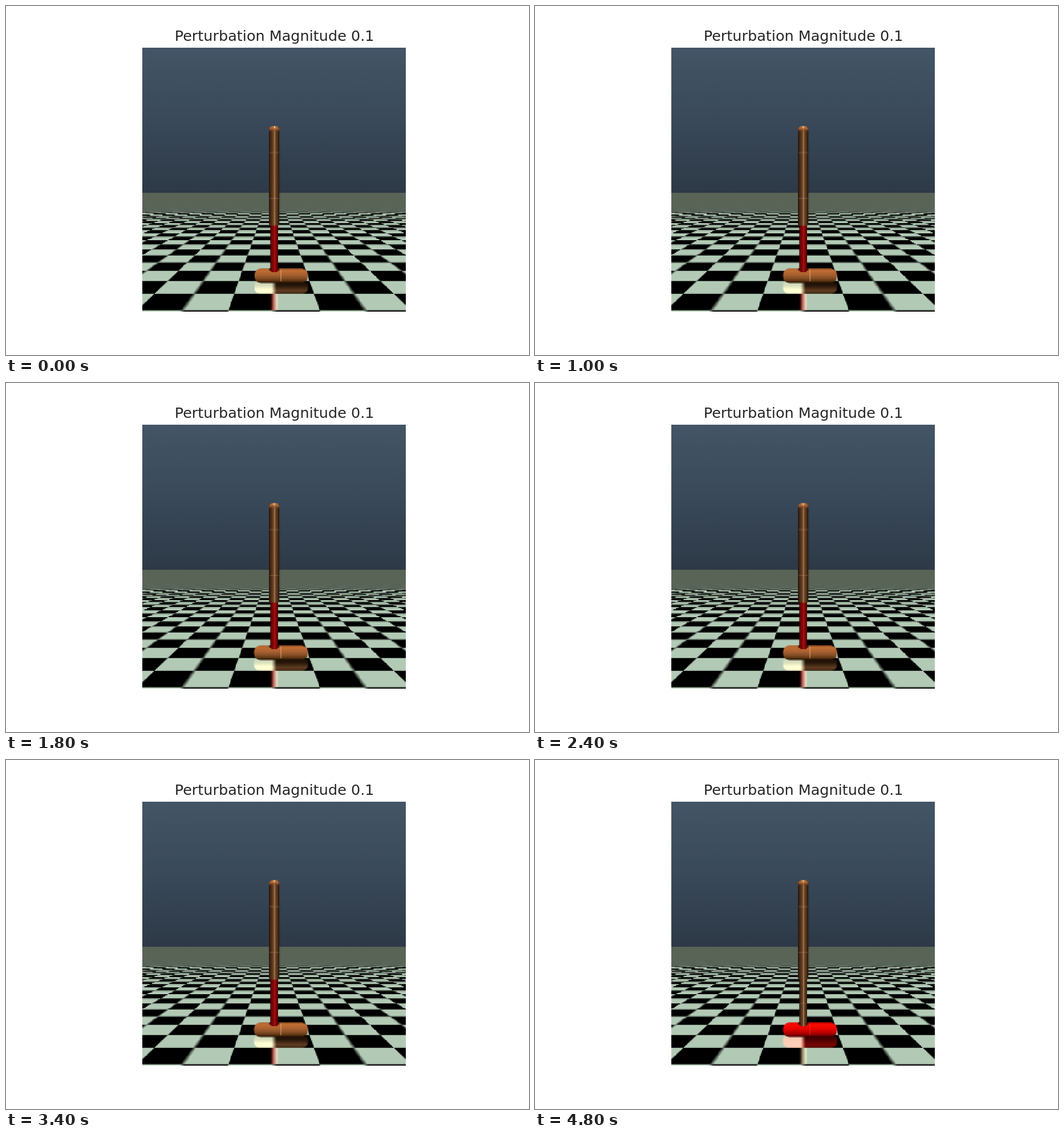
Animation, 917 px wide and 611 px high, one loop 5 s. Source, as an HTML page with a canvas:

```html
<!DOCTYPE html>
<html lang="en">
<head>
<meta charset="utf-8">
<title>Perturbation Magnitude</title>
<style>
  html, body { margin: 0; width: 100%; height: 100%; overflow: hidden; background: #fff; }
  canvas { display: block; }
</style>
</head>
<body>
<canvas id="stage" width="917" height="611"></canvas>
<script>
const LOOP = 5000, STEP = 200;
const RES = 256;
const VIEW = { x: 239.4, y: 73.2, size: 461.4 };
const PX = VIEW.size / RES;
const CX = 470.3;
const EYE_X = VIEW.x + VIEW.size / 2, EYE_Y = VIEW.y + VIEW.size / 2;
const EDGE_ROW = 141, EDGE_Y = VIEW.y + EDGE_ROW * PX;
const NEAR = 228.6, TILE = 0.35, FOCAL = 557;

const out = document.getElementById('stage').getContext('2d');

// The scene is drawn coarsely in stage coordinates, then enlarged without smoothing
const scene = document.createElement('canvas');
scene.width = scene.height = RES;
const ctx = scene.getContext('2d');
ctx.setTransform(1 / PX, 0, 0, 1 / PX, -VIEW.x / PX, -VIEW.y / PX);

const clamp = (v, a, b) => Math.min(b, Math.max(a, v));

// Square wave of period 2 averaged over a window of width w
const ramp = u => {
  const m = ((u % 2) + 2) % 2;
  return m < 1 ? m : 2 - m;
};
const wave = (u, w) => (ramp(u + w / 2) - ramp(u - w / 2)) / w;

function gradient(x0, y0, x1, y1, stops) {
  const g = ctx.createLinearGradient(x0, y0, x1, y1);
  stops.forEach(([at, color]) => g.addColorStop(at, color));
  return g;
}

function makeFloor() {
  const h = RES - EDGE_ROW;
  const layer = document.createElement('canvas');
  layer.width = RES;
  layer.height = h;
  const c = layer.getContext('2d');
  const img = c.createImageData(RES, h);
  const tile = [178, 202, 181], haze = [89, 100, 87];
  const rowStep = TILE / FOCAL;
  for (let j = 0; j < h; j++) {
    const d = EDGE_Y + (j + 0.5) * PX - EYE_Y;
    const row = (1 / d - 1 / NEAR) / rowStep;
    const sy = wave(row, PX / (d * d * rowStep));
    const scale = 1 / (TILE * d);
    const fade = clamp((d - 48) / 11, 0, 1);
    for (let i = 0; i < RES; i++) {
      const col = (VIEW.x + (i + 0.5) * PX - EYE_X) * scale;
      const soft = Math.round(col) % 2 === 0 ? 0.11 : 0;
      const sx = wave(col, Math.max(PX * scale, soft));
      const lit = 0.5 + 0.5 * sx * sy;
      const at = (j * RES + i) * 4;
      for (let k = 0; k < 3; k++) {
        img.data[at + k] = haze[k] + (tile[k] * lit - haze[k]) * fade;
      }
      img.data[at + 3] = 255;
    }
  }
  c.putImageData(img, 0, 0);
  return layer;
}

const floor = makeFloor();

const ROD = {
  wood: [[0, '#22130a'], [0.15, '#442714'], [0.4, '#623c20'], [0.5, '#875f40'], [0.55, '#9c7555'], [0.64, '#65401f'], [0.87, '#432713'], [1, '#20110a']],
  red: [[0, '#3c0000'], [0.18, '#6c0203'], [0.43, '#8a0608'], [0.54, '#a01216'], [0.68, '#880506'], [0.87, '#600102'], [1, '#350000']]
};
const FOOT = {
  wood: [[0, '#a85a26'], [0.15, '#c26e35'], [0.4, '#ab6230'], [0.65, '#895027'], [0.87, '#55300f'], [1, '#241307']],
  red: [[0, '#e40500'], [0.18, '#fb0b04'], [0.45, '#e50300'], [0.68, '#bd0100'], [0.87, '#800000'], [1, '#3c0000']]
};
const FOOT_GLOW = {
  wood: [[0, '#1c0f05'], [0.35, '#2c190b'], [0.7, '#5c3b20'], [1, '#4a2d16']],
  red: [[0, '#3a0200'], [0.4, '#560300'], [0.75, '#760602'], [1, '#640300']]
};
const SHIN_GLOW = {
  wood: [[0, '#140b05'], [0.45, '#523824'], [1, '#140b05']],
  red: [[0, '#240000'], [0.45, '#6c1512'], [1, '#180400']]
};

function pill(x, y, w, h, r, fill) {
  ctx.fillStyle = fill;
  ctx.beginPath();
  ctx.roundRect(x, y, w, h, r);
  ctx.fill();
}

function rod(top, bottom, half, tone, r) {
  const fill = gradient(CX - half, 0, CX + half, 0, ROD[tone]);
  pill(CX - half, top, half * 2, bottom - top, r, fill);
}

function seam(y, half) {
  ctx.fillStyle = 'rgba(205,165,125,0.25)';
  ctx.fillRect(CX - half + 1, y, half * 2 - 2, PX);
}

function drawBackdrop() {
  ctx.fillStyle = gradient(0, VIEW.y, 0, EDGE_Y, [[0, '#435566'], [0.5, '#394959'], [1, '#2d3947']]);
  ctx.fillRect(VIEW.x, VIEW.y, VIEW.size, EDGE_Y - VIEW.y);
  ctx.drawImage(floor, VIEW.x, EDGE_Y, VIEW.size, floor.height * PX);
}

function drawGlow(tone, left) {
  ctx.save();
  ctx.globalCompositeOperation = 'lighter';
  pill(left, 484, 529 - left, 19.5, [3, 3, 9, 9], gradient(0, 484, 0, 503.5, FOOT_GLOW[tone('foot')]));
  ctx.fillStyle = gradient(CX - 7, 0, CX + 7, 0, SHIN_GLOW[tone('shin')]);
  ctx.fillRect(CX - 7, 503.5, 14, 29);
  ctx.restore();
}

function drawFoot(tone, left) {
  pill(left, 459.2, 529 - left, 25.8, 11, gradient(0, 459.2, 0, 485, FOOT[tone]));
  ctx.fillStyle = tone === 'red' ? 'rgba(255,70,50,0.35)' : 'rgba(240,180,125,0.5)';
  ctx.fillRect(481, 461, PX, 21);
  ctx.fillStyle = 'rgba(30,10,4,0.75)';
  ctx.fillRect(461.5, 459.2, 18, 4);
}

function drawCap(shift) {
  const shape = [7, 7, 0, 0];
  pill(CX - 9.2, 210.8, 18.4, 10, shape, gradient(0, 210.8, 0, 220.8,
    [[0, '#c47a40'], [0.5, 'rgba(168,94,46,0.8)'], [1, 'rgba(110,64,36,0)']]));
  ctx.fillStyle = '#f0d6bd';
  ctx.fillRect(469.4 + shift, 210.5, PX, 3.4);
}

function drawHopper(tone, shift) {
  const left = 435 + shift;
  drawGlow(tone, left);
  drawFoot(tone('foot'), left);
  rod(382, 466, 7, tone('shin'), [0, 0, 4, 4]);
  rod(294, 384.5, 9.2, tone('thigh'), [0, 0, 3, 3]);
  rod(210.8, 295, 9.2, tone('torso'), [7, 7, 0, 0]);
  drawCap(shift);
  seam(256, 9.2);
  if (tone('thigh') === 'wood') seam(336, 9.2);
  if (tone('shin') === 'wood') seam(425, 7);
}

function drawTitle() {
  out.fillStyle = '#262626';
  out.font = '25.5px "DejaVu Sans", sans-serif';
  out.textAlign = 'center';
  out.fillText('Perturbation Magnitude 0.1', 470.6, 60.5);
}

const activePart = t => t < 4200 ? 'shin' : t < 4800 ? 'thigh' : 'foot';
const sway = t => t < 1000 || (t >= 3000 && t < 3400) ? 0.8 : 0;

function render(time) {
  const t = Math.floor((time % LOOP) / STEP) * STEP;
  const active = activePart(t);
  drawBackdrop();
  drawHopper(part => part === active ? 'red' : 'wood', sway(t));

  out.fillStyle = '#fff';
  out.fillRect(0, 0, 917, 611);
  out.imageSmoothingEnabled = false;
  out.drawImage(scene, VIEW.x, VIEW.y, VIEW.size, VIEW.size);
  drawTitle();
}

const start = performance.now();
function tick() {
  render(performance.now() - start);
  requestAnimationFrame(tick);
}
tick();
</script>
</body>
</html>
```
